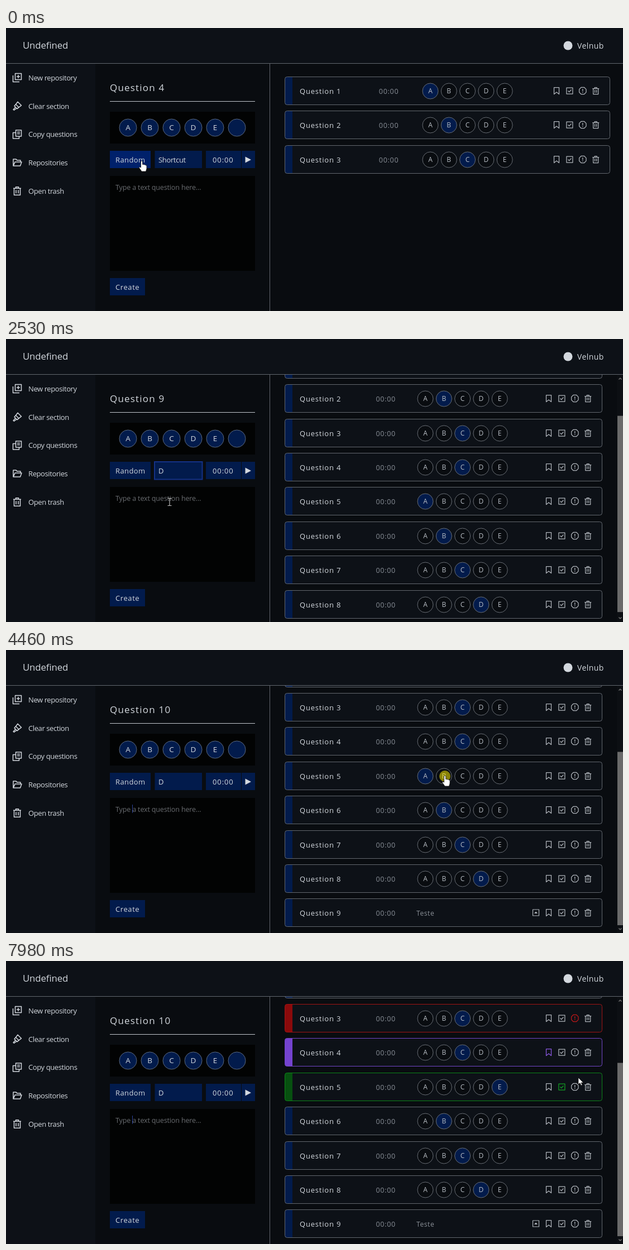
An HTML page for the animation above (8000 ms loop, 1105 by 507 pixels).

```html
<!DOCTYPE html>
<html lang="en">
<head>
<meta charset="utf-8">
<title>Question board</title>
<style>
  html, body { margin: 0; width: 100%; height: 100%; overflow: hidden; background: #090c10; }
  svg { display: block; font-family: "Open Sans", "Noto Sans", sans-serif; }
  text { white-space: pre; }
</style>
</head>
<body>
<svg width="1105" height="507" viewBox="0 0 1105 507">
  <defs><clipPath id="view"><path d="M473 64H1105V507H473z"/></clipPath></defs>
  <g id="base"></g>
  <g id="live"></g>
</svg>
<script>
const LOOP = 8000, PITCH = 61.4;
const NAVY = '#021b4c', PANEL = '#0d1117', LINE = '#62676e', LIGHT = '#d3d8de';

const clamp = v => Math.max(0, Math.min(1, v));
const ease = (t, a, b) => { const k = clamp((t - a) / (b - a)); return k * k * (3 - 2 * k); };

// Drawing helpers, each returns SVG markup
const rect = (x, y, w, h, fill, more = '') =>
  `<rect x="${x}" y="${y}" width="${w}" height="${h}" fill="${fill}" ${more}/>`;
const text = (x, y, s, size, fill = LIGHT, gap = 0, anchor = 'start') =>
  `<text x="${x}" y="${y}" font-size="${size}" fill="${fill}" letter-spacing="${gap}" text-anchor="${anchor}">${s}</text>`;
const path = (d, stroke, width = 1, fill = 'none') =>
  `<path d="${d}" stroke="${stroke}" stroke-width="${width}" fill="${fill}" stroke-linejoin="round"/>`;
const at = (x, y, s, more = '') => `<g transform="translate(${x} ${y})${more}">${s}</g>`;
const circle = (x, y, r, fill, stroke = 'none') =>
  `<circle cx="${x}" cy="${y}" r="${r}" fill="${fill}" stroke="${stroke}"/>`;
const option = (x, y, r, s, fill, stroke, size, ink) =>
  circle(x, y, r, fill, stroke) + text(x, y + size * .36, s, size, ink, 0, 'middle');

const TRASH = 'M-6-4H6M-2-4V-6H2V-4M-4.5-4V6H4.5V-4M-1.5-1.5V3.5M1.5-1.5V3.5';
const ICONS = [
  'M-4.5-6H4.5V6L0 2.5L-4.5 6z',
  'M-5.5-5.5H5.5V5.5H-5.5zM-2.8 0L-.7 2.2L3-2',
  'M-2.6-6.2H2.6L6.2-2.6V2.6L2.6 6.2H-2.6L-6.2 2.6V-2.6zM0-3.5V.8M0 2V3.5',
  TRASH
];
const EXPAND = 'M-5.5-5.5H5.5V5.5H-5.5zM-2 1L0-1.2L2 1z';
const MENU = [
  ['New repository', 'M-3.5-7.5H7.5V3.5H-3.5zM2-5V1M-1-2H5M-7.5-4V7.5H4'],
  ['Clear section', 'M1-7.5L7.5-1L3 2.5L-2.5-3zM-2.5-3L-5 0L0 5L3 2.5M-3 2L-7 6.5L-5.5 7.5L-1 4'],
  ['Copy questions', 'M-2.5-7.5H7.5V3.5H-2.5zM0-4H5M0-1H5M-2.5-3H-7.5V7.5H3.5V3.5'],
  ['Repositories', 'M-7 6V-6H-2L0-4H6V-1M-7 6L-4-1H8L5.5 6z'],
  ['Open trash', 'M-7-4.5H7M-2.5-4.5V-7H2.5V-4.5M-5.5-4.5V7.5H5.5V-4.5M-2-1.5V4.5M2-1.5V4.5']
];

function drawBase() {
  let s = rect(0, 0, 1105, 63, PANEL) + rect(0, 64, 160, 443, PANEL);
  s += rect(0, 63, 1105, 1, LINE) + rect(472, 63, 1, 444, LINE);
  s += text(30, 37, 'Undefined', 16.8, LIGHT, -.1);
  s += circle(1006.5, 31.5, 8, LIGHT) + text(1023, 36.5, 'Velnub', 14, LIGHT, .4);
  MENU.forEach(([label, d], i) => {
    const y = 89 + i * 50.7;
    s += at(20, y, path(d, LIGHT, 1.5)) + text(40, y + 5, label, 13, LIGHT, -.4);
  });
  s += rect(186, 131, 260, 1, '#c2c7cd') + rect(186, 150, 260, 57, '#020303');
  [...'ABCDE', ''].forEach((c, i) => s += option(218.5 + i * 39, 178.5, 15.5, c, NAVY, '#5c6a80', 13.5, LIGHT));
  s += rect(358, 220, 63, 31, NAVY) + text(370, 241.3, '00:00', 13, LIGHT, .9);
  s += rect(422, 220, 24, 31, NAVY) + path('M428.5 230.5V241.5L439 236z', 'none', 0, LIGHT);
  return s + rect(186, 265, 260, 170, '#020303');
}

// Pointer stops: time, x, y
const STOPS = [
  [0, 243, 239], [250, 243, 239], [650, 307, 238], [1250, 307, 238], [1350, 306, 237],
  [2100, 306, 237], [2200, 301, 238], [2300, 301, 238], [2530, 293, 292], [3400, 292, 290],
  [3800, 229, 471], [4040, 229, 471], [4400, 786, 226], [4640, 786, 226], [4760, 818, 226],
  [4860, 818, 226], [4960, 851, 226], [5060, 851, 226], [5160, 884, 227], [5250, 884, 227],
  [5380, 978, 225], [5500, 985, 222], [6050, 985, 222], [6180, 982, 178], [6300, 972, 161],
  [6600, 972, 161], [6950, 1018, 100], [7500, 1018, 100], [7880, 1041, 134], [7980, 1025, 209]
];
const CLICKS = [[50, 150], [600, 690], [2620, 2720], [3860, 3960], [4410, 4610],
  [4780, 4870], [4980, 5070], [5170, 5250], [5700, 5800], [6380, 6480], [7180, 7280]];

function pointer(t) {
  const i = STOPS.findIndex(p => p[0] > t);
  if (i < 0) return STOPS[STOPS.length - 1].slice(1);
  const [a, b] = [STOPS[i - 1], STOPS[i]], k = ease(t, a[0], b[0]);
  return [a[1] + (b[1] - a[1]) * k, a[2] + (b[2] - a[2]) * k];
}

const CURSORS = {
  arrow: path('M0 0V12L3 9.5L5 14L7 13L5 9H9z', '#111', .7, '#fff'),
  beam: path('M-3.5-6.5H-1L0-6L1-6.5H3.5M0-6V6M-3.5 6.5H-1L0 6L1 6.5H3.5', '#c8c8c8', 1.1),
  hand: path('M-1.5 0Q0-2 1.6 0V5.5Q3.2 4.5 4.2 6Q5.8 5 6.6 6.7Q8.8 6 9 8.5V13L7.5 18H0L-4.5 11.5Q-4.5 9-1.5 11z', '#111', .8, '#fff')
};

// When each question appears, and its answer
const BORN = [-1, -1, -1, 100, 2100, 2150, 2200, 2250, 3940];
const ANSWERS = 'ABCCABCD';
const MARKS = [
  { row: 3, icon: 0, from: 6440, edge: '#7346c8', bar: '#7443cf', ink: '#8a58e0' },
  { row: 4, icon: 1, from: 5760, edge: '#0d8419', bar: '#075010', ink: '#13a024' },
  { row: 2, icon: 2, from: 7240, edge: '#a11414', bar: '#8a0a0b', ink: '#c31818' }
];

function answer(i, t) {
  if (i !== 4 || t < 4610) return ANSWERS[i];
  return t < 4820 ? 'B' : t < 5020 ? 'C' : t < 5210 ? 'D' : 'E';
}

function draw(t) {
  const [px, py] = pointer(t);
  const over = (x, y, w, h) => px >= x && px < x + w && py >= y && py < y + h;
  const count = BORN.filter(b => t >= b).length;
  const wide = count < 7;
  const limit = Math.max(0, 71.5 + (count - 8) * PITCH);
  const scroll = Math.min(limit, 71.5 * ease(t, 2165, 2595) + PITCH * ease(t, 3940, 4320));
  const onRandom = over(186, 220, 73, 31), onCreate = over(186, 448, 63, 31);
  let cursor = onRandom || onCreate ? 'hand' : 'arrow';
  if (over(266, 220, 85, 31) || over(186, 265, 260, 170)) cursor = 'beam';

  // Form
  let s = text(186, 113, 'Question ' + (count + 1), 17, LIGHT, 1.2);
  s += rect(186, 220, 73, 31, onRandom ? '#00216b' : NAVY) + text(196, 241.3, 'Random', 13, LIGHT, .4);
  s += t >= 640 && t < 2660
    ? rect(266, 220, 85.5, 31.5, NAVY, 'stroke="#143186" stroke-width="2"')
    : rect(266.5, 220, 84.5, 31, NAVY);
  s += count < 5 ? text(273, 241.3, 'Shortcut', 13, LIGHT, -.35)
    : text(273, 241.3, 'ABCD'[Math.min(count, 8) - 5], 13);
  s += rect(186, 448, 63, 31, onCreate ? '#0a3183' : NAVY) + text(196, 468.5, 'Create', 13, LIGHT, .6);

  const typed = [2880, 3060, 3210, 3260, 3310].filter(k => t >= k).length;
  s += typed && t < 3940 ? text(196, 289.5, 'Teste'.slice(0, typed), 12.3)
    : text(196, 289.5, 'Type a text question here...', 12.5, '#696c70', -.14);
  if (t >= 3360 && t < 3940) s += path('M197 291.5q1 2 2 0' + 't2 0'.repeat(13), '#d01c1c', 1);
  if (t >= 2660) s += rect([196, 203, 210, 216, 220, 226][typed], 277, 1, 15, '#2c429a');

  // Question list
  const width = wide ? 582 : 568, shift = wide ? 14 : 0;
  let list = '';
  for (let i = 0; i < count; i++) {
    const y = Math.round(87 + i * PITCH - scroll), mid = y + 26;
    const mark = MARKS.find(m => m.row === i && t >= m.from);
    list += rect(499.5, y + .5, width, 50, PANEL, 'rx="4"');
    list += path(`M513 ${y + .5}H503Q499.5 ${y + .5} 499.5 ${y + 4}V${y + 47}Q499.5 ${y + 50.5} 503 ${y + 50.5}H513z`,
      'none', 0, mark ? mark.bar : NAVY);
    list += rect(499.5, y + .5, width, 50, 'none', `rx="4" stroke="${mark ? mark.edge : LINE}"`);
    list += text(526, mid + 5, 'Question ' + (i + 1), 13, LIGHT, .8);
    list += text(662.5 + shift * .38, mid + 5, '00:00', 12.5, '#888e96', .7);
    if (i === 8) {
      list += text(735, mid + 4.7, 'Teste', 12, '#8b9198', .6);
      list += at(949, mid - .5, path(EXPAND, '#b0b5bb', 1.2));
    } else {
      [...'ABCDE'].forEach((c, k) => {
        const x = 751 + shift * .64 + k * 33.3;
        if (Math.hypot(px - x, py - mid) < 14) cursor = 'hand';
        list += option(x, mid, 14, c, c === answer(i, t) ? NAVY : '#090c10', '#686d74', 12, '#b7bdc4');
      });
    }
    ICONS.forEach((d, k) => {
      const x = 972 + shift + k * 23.4;
      if (over(x - 11, mid - 12, 22, 24)) {
        cursor = 'hand';
        list += rect(x - 11, mid - 12, 22, 24, NAVY);
      }
      list += at(x, mid - .5, path(d, mark && mark.icon === k ? mark.ink : '#b0b5bb', 1.25));
    });
  }
  if (!wide) {
    const thumb = 415.5 * 393 / (393 + limit);
    list += rect(1094, 64, 11, 443, '#0c0f13');
    list += rect(1095, 77.5 + (415.5 - thumb) * scroll / limit, 10, thumb, '#6a6a6a');
    list += path('M1097.5 72.5L1100 70L1102.5 72.5M1097.5 498.5L1100 501L1102.5 498.5', '#777', 1.3);
  }
  s += `<g clip-path="url(#view)">${list}</g>`;

  if (CLICKS.some(([a, b]) => t >= a && t < b)) s += circle(px, py, 10, 'rgba(255,240,0,.52)');
  return s + at(px, py, CURSORS[cursor]);
}

const live = document.getElementById('live');
document.getElementById('base').innerHTML = drawBase();
const start = performance.now();
let last = '';
function frame() {
  const now = draw((performance.now() - start) % LOOP);
  if (now !== last) live.innerHTML = last = now;
  requestAnimationFrame(frame);
}
frame();
</script>
</body>
</html>
```
